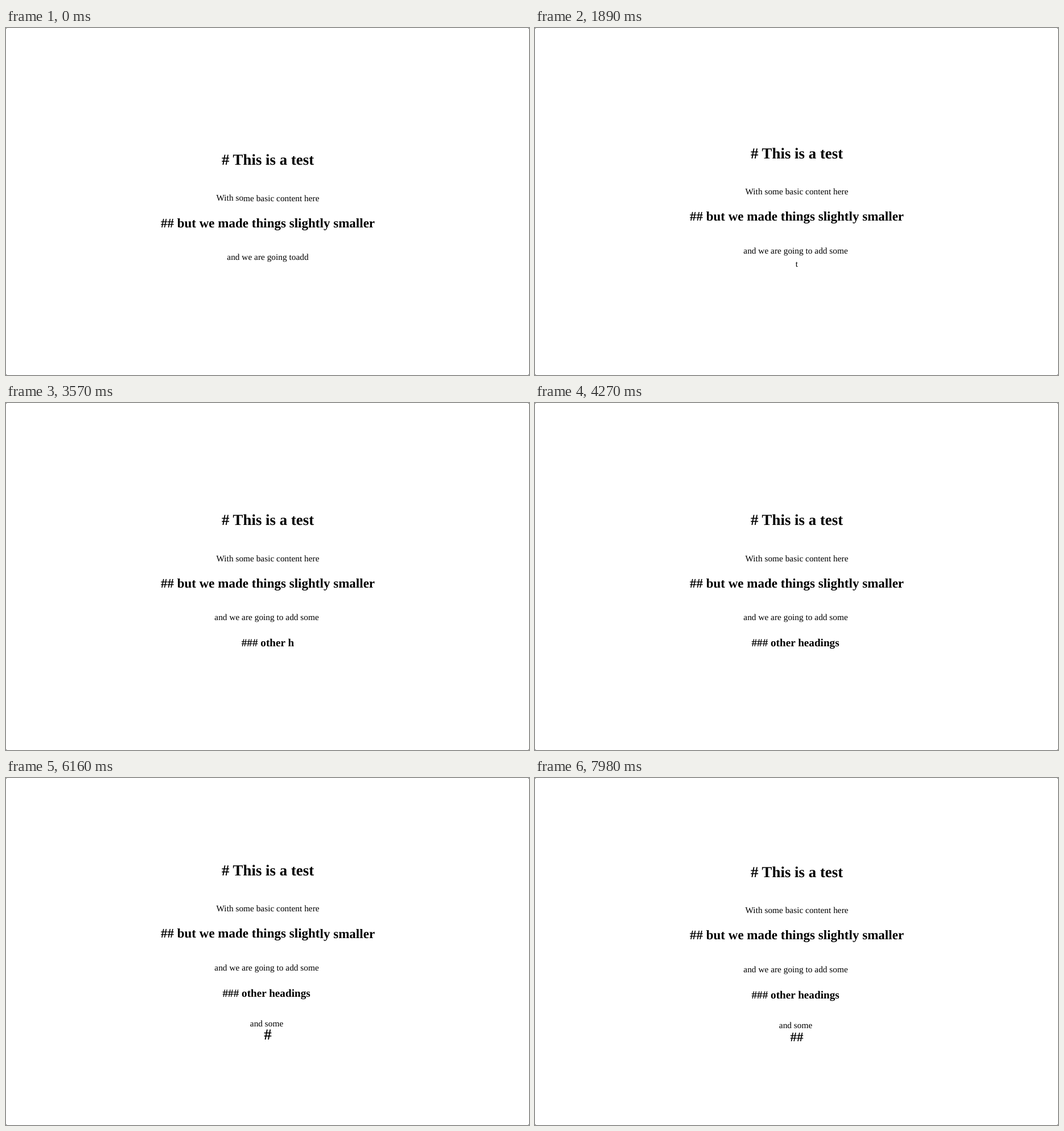
Animation of 919x609 px, one loop 8 s. Source, as an HTML page:

```html
<!DOCTYPE html>
<html lang="en">
<head>
<meta charset="utf-8">
<title>Markdown typing</title>
<style>
  html, body { margin: 0; width: 100%; height: 100%; overflow: hidden; background: #fff; }
  svg { display: block; width: 919px; height: 609px; }
  text {
    font-family: "Liberation Serif", "Times New Roman", Times, serif;
    text-anchor: middle;
    white-space: pre;
    text-rendering: geometricPrecision;
    fill: #000;
  }
</style>
</head>
<body>
<svg viewBox="0 0 919 609" xmlns="http://www.w3.org/2000/svg">
  <rect width="919" height="609" fill="#fff"/>
  <path fill="#555" fill-rule="evenodd" d="M0 0H919V609H0Z M2.5 0H916.5A2.5 2.5 0 0 1 919 2.5V606.5A2.5 2.5 0 0 1 916.5 609H2.5A2.5 2.5 0 0 1 0 606.5V2.5A2.5 2.5 0 0 1 2.5 0Z"/>
  <!-- the minute turn keeps baselines from snapping to whole pixels -->
  <g id="page" transform="rotate(0.02 460 335)"></g>
</svg>
<script>
const LOOP = 8000, TICK = 70;
const EM = 15.36, LEADING = 1.5;
const CENTER_X = 460, MIDDLE = 335.2;
const SCALE = [1, 1.75, 1.5, 1.25];   // plain text, #, ##, ###

const START = "# This is a test\n\nWith some basic content here\n\n" +
  "## but we made things slightly smaller\n\nand we are going toadd";

// [first key time, ms per key, keys]; \b is backspace
const KEYS = [
  [70, 100, "\b\b\b add som"],
  [1120, 70, "e \ntit"],
  [1610, 70, "\b"],
  [1890, 140, "\b\b\n"],
  [2310, 120, "## \b"],
  [2940, 84, "# other headi"],
  [3990, 70, "ngs "],
  [4340, 140, "\n\n"],
  [4830, 120, "and some "],
  [5880, 70, "\n"],
  [6160, 70, "#"],
  [6300, 70, "# "],
  [6650, 140, "\b\b\b"],
  [7280, 94, "### "],
  [7840, 140, "\b\b"]
];

const states = [{ time: 0, doc: START }];
for (const [first, gap, keys] of KEYS) {
  [...keys].forEach((key, i) => {
    const doc = states[states.length - 1].doc;
    states.push({
      time: first + Math.floor(i * gap / TICK) * TICK,
      doc: key === "\b" ? doc.slice(0, -1) : doc + key
    });
  });
}

const page = document.getElementById("page");

function addLine(str, size, bold, y) {
  const el = document.createElementNS("http://www.w3.org/2000/svg", "text");
  el.setAttribute("x", CENTER_X);
  el.setAttribute("y", y.toFixed(2));
  el.setAttribute("font-size", size);
  if (bold) el.setAttribute("font-weight", 700);
  el.textContent = str;
  page.appendChild(el);
}

// Stack the lines and centre the block; each line advances by its own height.
function render(doc) {
  const lines = doc.split("\n").map(str => {
    const level = str.match(/^#{0,3}/)[0].length;
    return { str, level, size: EM * SCALE[level] };
  });
  const height = lines.reduce((sum, l) => sum + l.size * LEADING, 0);
  let y = MIDDLE - height / 2;
  page.replaceChildren();
  for (const { str, level, size } of lines) {
    if (str) addLine(str, size, level > 0, y);
    y += size * LEADING;
  }
}

let shown = null;
function draw(now) {
  const t = now % LOOP;
  const state = states.findLast(s => s.time <= t);
  if (state !== shown) render((shown = state).doc);
}

let origin = null;
function loop(now) {
  if (origin === null) origin = now;
  draw(now - origin);
  requestAnimationFrame(loop);
}
draw(0);
requestAnimationFrame(loop);
</script>
</body>
</html>
```
